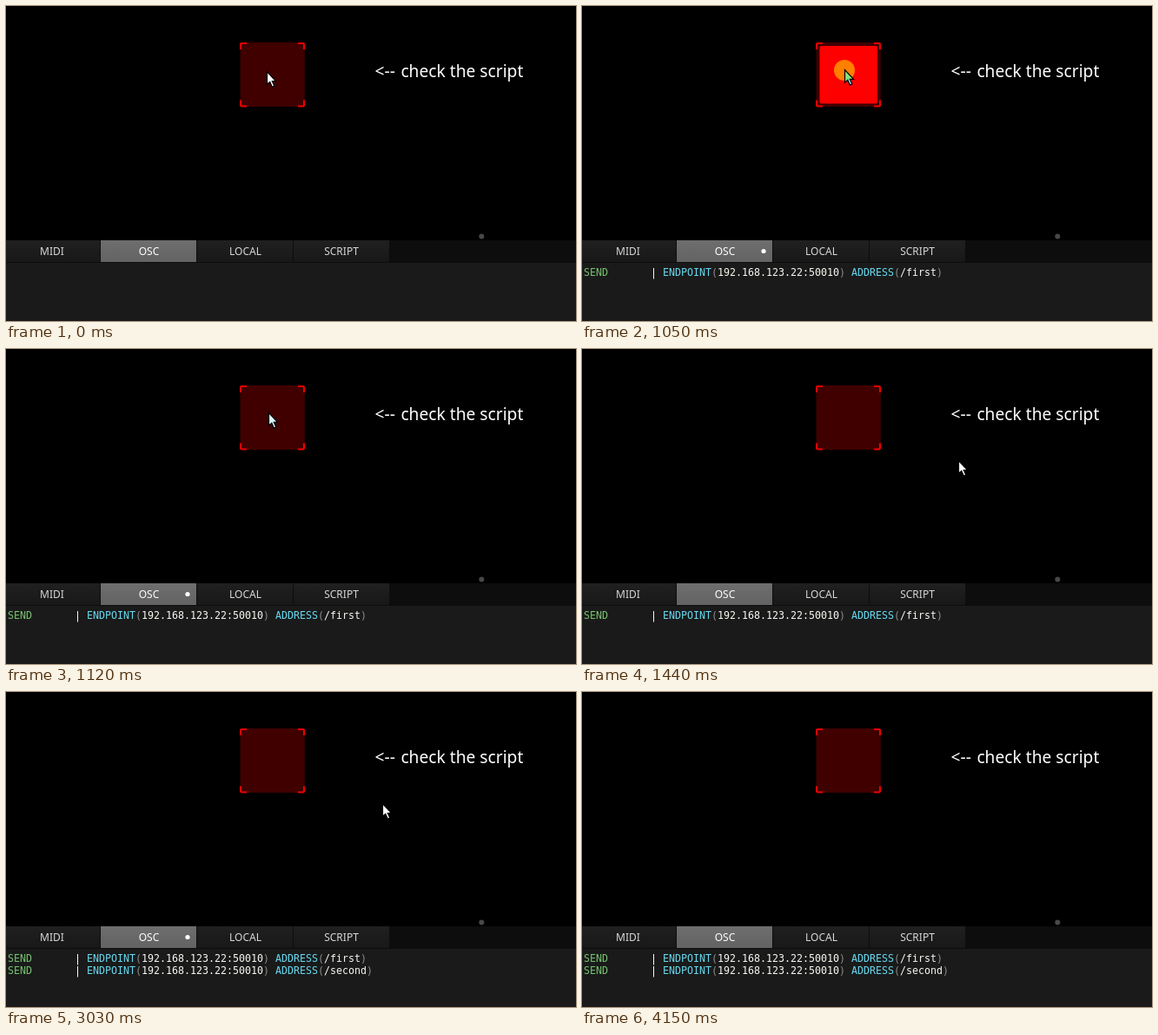
An HTML page with a canvas for the animation above (5.21 s loop, 656 by 363 pixels).

```html
<!DOCTYPE html>
<html lang="en">
<head>
<meta charset="utf-8">
<title>Script button demo</title>
<style>
  html, body { margin: 0; width: 100%; height: 100%; overflow: hidden; background: #000; }
  canvas { display: block; width: 656px; height: 363px; }
</style>
</head>
<body>
<canvas id="stage" width="656" height="363"></canvas>
<script>
const ctx = document.getElementById('stage').getContext('2d');
const LOOP = 5210;
const SANS = '"Noto Sans", sans-serif';
const TITLE = '19.2px ' + SANS;
const MONO = '11.63px "DejaVu Sans Mono", monospace';
const CELL = 7;

// Pointer tip positions, each held until the next time; null hides it.
const POINTER = [
  [0, [300.5, 75.8]],
  [60, [302.5, 73.6]],
  [1270, [345, 95]],
  [1350, [405, 121]],
  [1440, [433.5, 128.8]],
  [3950, [470, 143]],
  [4020, [532, 159]],
  [4080, [586, 171]],
  [4150, null]
];
const TABS = [['MIDI', 0, 108, 53], ['OSC', 109, 110, 164.5],
              ['LOCAL', 220, 110, 275.5], ['SCRIPT', 331, 110, 386]];
const LOG = [[1050, '/first'], [3030, '/second']];

const between = (t, from, to) => t >= from && t < to;

function rect(x, y, w, h, fill) {
  ctx.fillStyle = fill;
  ctx.fillRect(x, y, w, h);
}

function disc(x, y, r, fill) {
  ctx.fillStyle = fill;
  ctx.beginPath();
  ctx.arc(x, y, r, 0, Math.PI * 2);
  ctx.fill();
}

function text(str, x, y, font, fill, align = 'left') {
  ctx.font = font;
  ctx.textAlign = align;
  ctx.fillStyle = fill;
  ctx.fillText(str, x, y);
}

function shade(y, h, top, bottom) {
  const g = ctx.createLinearGradient(0, y, 0, y + h);
  g.addColorStop(0, top);
  g.addColorStop(1, bottom);
  return g;
}

function drawButton(pressed) {
  rect(269.5, 42, 74.3, 74, '#400000');
  if (pressed) {
    ctx.fillStyle = '#f00';
    ctx.beginPath();
    ctx.roundRect(273.5, 46, 66.5, 66.5, 2);
    ctx.fill();
    disc(302, 74, 12, '#ff7f00');
  }
  ctx.strokeStyle = '#f00000';
  ctx.lineWidth = 2;
  for (const [x, sx] of [[270, 1], [343, -1]]) {
    for (const [y, sy] of [[43, 1], [115.5, -1]]) {
      ctx.beginPath();
      ctx.moveTo(x + 7 * sx, y);
      ctx.lineTo(x + sx, y);
      ctx.lineTo(x, y + sy);
      ctx.lineTo(x, y + 7 * sy);
      ctx.stroke();
    }
  }
}

function drawTabs(busy) {
  rect(0, 270, 656, 26, '#0d0d0d');
  for (const [name, x, w, mid] of TABS) {
    const on = name === 'OSC';
    rect(x, 270, w, 25, on ? shade(270, 25, '#6e6e6e', '#636363')
                           : shade(270, 25, '#202020', '#181818'));
    text(name, mid, 287, '12px ' + SANS, on ? '#fff' : '#d8d8d8', 'center');
  }
  if (busy) disc(209, 282.5, 2.6, '#fff');
}

function drawLog(t) {
  rect(0, 296, 656, 67, '#1a1a1a');
  LOG.forEach(([start, address], row) => {
    if (t < start) return;
    const put = (col, str, fill) => text(str, 2 + col * CELL, 311 + row * 14, MONO, fill);
    put(0, 'SEND', '#76c46d');
    put(11, '|', '#fff');
    put(13, 'ENDPOINT', '#66d9ef');
    put(21, '(', '#8c8c8c');
    put(22, '192.168.123.22:50010', '#f8f8f2');
    put(42, ')', '#8c8c8c');
    put(44, 'ADDRESS', '#66d9ef');
    put(51, '(', '#8c8c8c');
    put(52, address, '#f8f8f2');
    put(52 + address.length, ')', '#8c8c8c');
  });
}

function drawPointer(t, pressed) {
  const tip = POINTER.filter(([start]) => t >= start).pop()[1];
  if (!tip) return;
  const [x, y] = tip;
  const arrow = new Path2D();
  for (const [dx, dy] of [[0, 0], [0, 14.5], [3.3, 11.6], [5.8, 17.5],
                          [8.3, 16.4], [5.8, 10.7], [10, 10.7]]) {
    arrow.lineTo(x + dx, y + dy);
  }
  arrow.closePath();
  const hover = between(t, 60, 1270);
  ctx.fillStyle = pressed ? '#7fefff' : hover ? '#dcf6fb' : '#fff';
  ctx.fill(arrow);
  if (pressed) {
    ctx.save();
    ctx.clip(arrow);
    disc(302, 74, 12, '#7fe67f');
    ctx.restore();
  }
  ctx.strokeStyle = '#000';
  ctx.lineWidth = 1.2;
  ctx.stroke(arrow);
}

function draw(t) {
  const pressed = between(t, 1050, 1120);
  const busy = LOG.some(([start]) => between(t, start, start + 130));
  rect(0, 0, 656, 363, '#000');
  drawButton(pressed);
  text('<--', 424.5, 82, TITLE, '#fff');
  text('check the script', 454.4, 82, TITLE, '#fff');
  disc(547.3, 265.5, 3, '#484848');
  drawTabs(busy);
  drawLog(t);
  drawPointer(t, pressed);
}

const origin = performance.now();
function tick() {
  draw((performance.now() - origin) % LOOP);
  requestAnimationFrame(tick);
}
tick();
</script>
</body>
</html>
```
